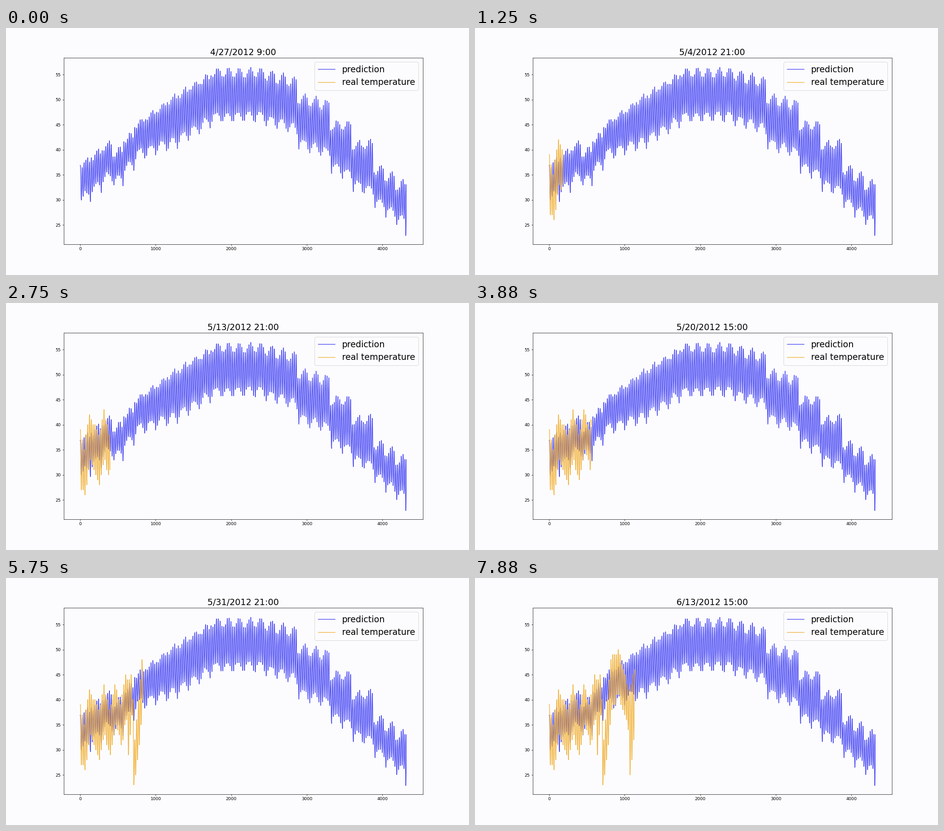
Write a matplotlib script that moves like this. It is 1025 px wide and 547 px high and loops after 8000 ms.

```python
import numpy as np
import matplotlib.pyplot as plt
from matplotlib.animation import FuncAnimation

FRAMES, INTERVAL, STEP = 64, 125, 18   # STEP: hours revealed per frame
DAYS, BLOCK = 180, 6                   # the forecast repeats in blocks of days
PT = 0.72 * 1025 / 1080                # points at 100 dpi for a 15 x 8 in layout
BG = "#fcfcfe"

# Key points: block, highest and lowest forecast
TREND = [(0, 38.4, 31.6), (2, 41.6, 35.4), (3, 40.5, 34.8), (5, 46.2, 40.2),
         (8, 51, 42.2), (12, 56.4, 47.5), (16, 56.4, 47.5), (19, 54.6, 45.2),
         (20, 51.1, 42), (22, 50, 40.5), (23, 45.8, 37.2), (24, 45.7, 36.2),
         (25, 41.8, 33.7), (26, 42, 33), (27, 37, 30.3), (29, 33.9, 26.8)]

# Key points: day, measured high and low
WEATHER = [(0, 39, 27), (2, 35, 26), (5, 42, 33), (10, 38, 28), (13, 43, 33),
           (16, 38, 29), (19, 43, 35), (22, 39, 31), (25, 45, 36),
           (26, 44, 29), (28, 45, 37), (29, 40, 23), (30, 32, 25),
           (34, 48, 38), (38, 50, 41), (43, 43, 34), (44, 42, 25), (47, 46, 35)]

rng = np.random.default_rng(4)


def envelope(keys, x, jitter):
    """Highs and lows at x between the key points, with a little noise."""
    at, hi, lo = np.transpose(keys)
    return [np.interp(x, at, v) + rng.uniform(-jitter, jitter, len(x))
            for v in (hi, lo)]


def diurnal(hi, lo, end, hours):
    """Hourly curve easing between daily highs (hour 3) and lows (hour 15)."""
    knots = np.append(np.column_stack([hi, lo]).ravel(), end)
    pos = np.clip((np.arange(hours) - 3) / 12, 0, len(knots) - 1.001)
    i = pos.astype(int)
    ease = (1 - np.cos(np.pi * (pos - i))) / 2
    return knots[i] + (knots[i + 1] - knots[i]) * ease


def forecast():
    block, day = np.divmod(np.arange(DAYS), BLOCK)
    hi, lo = envelope(TREND, block, .25)
    hi += np.cos(2 * np.pi * (day - 3.7) / BLOCK) - 1
    lo -= .3 * (day - 2.5) ** 2
    lo[-1] = 22.85
    return diurnal(hi, lo, 39, DAYS * 24 - 1)


def measured():
    days = STEP * FRAMES // 24
    hi, lo = np.round(envelope(WEATHER, np.arange(days), .49))
    return np.round(diurnal(hi, lo, hi[-1], days * 24))


def stamp(hours):
    day, hour = divmod(9 + hours, 24)
    day += 27
    month = 4
    for length in (30, 31):
        if day > length:
            day -= length
            month += 1
    return f"{month}/{day}/2012 {hour}:00"


pred, real = forecast(), measured()

fig = plt.figure(figsize=(10.25, 5.47), dpi=100, facecolor=BG)
ax = fig.add_axes([0.125, 0.125, 0.775, 0.755], facecolor=BG)
ax.set_xlim(-215.9, 4533.9)
ax.set_ylim(21.16, 58.37)
ax.set_xticks(range(0, 4001, 1000))
ax.set_yticks(range(25, 56, 5))
ax.tick_params(labelsize=10 * PT, length=3.5 * PT, width=.8 * PT, pad=3.5 * PT)
for spine in ax.spines.values():
    spine.set_linewidth(.8 * PT)

width = 1.5 * PT
ax.plot(pred, color="#0000f0", alpha=.7, linewidth=width, label="prediction")
line, = ax.plot([], [], color="#f0a81e", alpha=.85, linewidth=width,
                label="real temperature")
title = ax.set_title("", fontsize=20 * PT, pad=6 * PT)
legend = ax.legend(loc="upper right", fontsize=20 * PT, facecolor=BG)
legend.get_frame().set_linewidth(PT)


def draw(frame):
    n = STEP * frame
    line.set_data(np.arange(n), real[:n])
    title.set_text(stamp(n))
    return line, title


anim = FuncAnimation(fig, draw, frames=FRAMES, interval=INTERVAL,
                     repeat=True, repeat_delay=0, blit=False)
plt.show()
```
